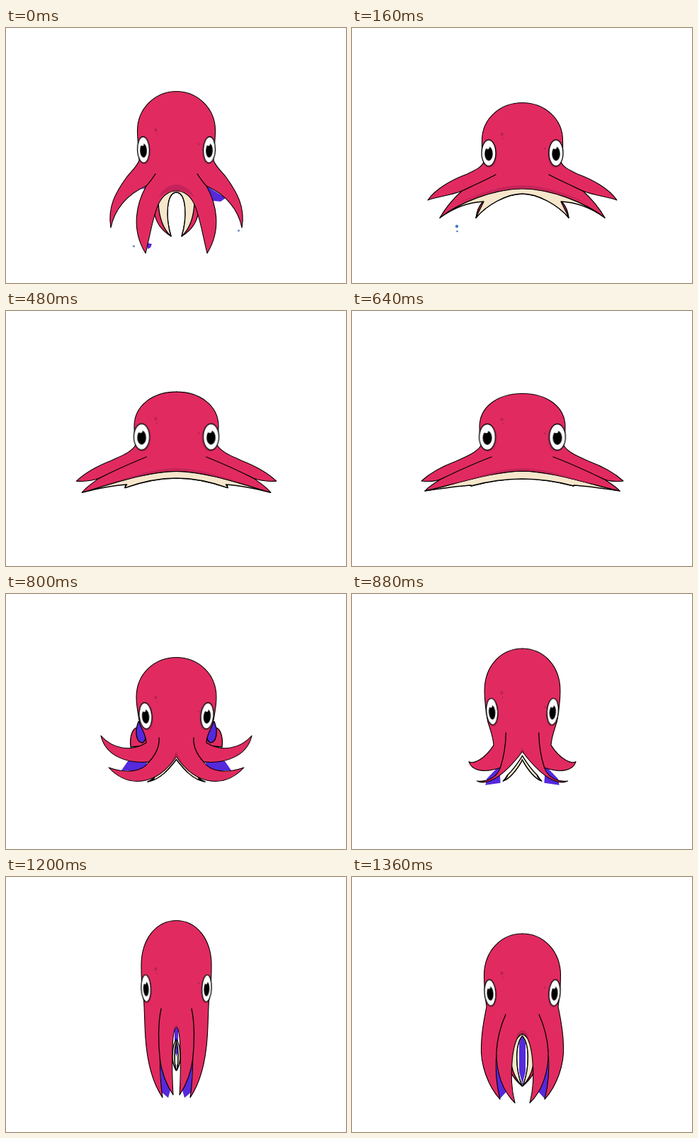
Recreate the animation shown at these times as an HTML page without scripts. Size 480x360 px, loop 1.44 s.

```html
<!DOCTYPE html>
<html lang="en">
<head>
<meta charset="utf-8">
<title>Swimming octopus</title>
<style>
html, body { margin: 0; width: 100%; height: 100%; overflow: hidden; background: #fff; }
svg { display: block; width: 100vw; height: 100vh; }
path, ellipse { stroke: #000; stroke-width: 1.3; stroke-linejoin: round; vector-effect: non-scaling-stroke; }
.move { animation: 1.44s steps(2) infinite; }
.body { animation-name: body; fill: #e12b60; stroke-width: 1.1; }
.crease { animation-name: crease; fill: none; stroke-linecap: round; }
.back { animation-name: back; fill: #e12b60; }
.belly { animation-name: belly; fill: #f6e6cb; }
.shade { animation-name: shade; fill: #c3245a; stroke: none; }
.inside { animation-name: inside; fill: #5529dc; stroke: none; }
.eye { animation-name: eye; }
.spots { animation-name: spots; fill: #bd2457; }
.flash { opacity: 0; animation: flash 1.44s step-end infinite; }
.curl { animation-delay: 800ms; }
.pink { fill: #e12b60; }
.blue { fill: #5529dc; }
.white { fill: #fff; }
.halo { fill: #c9265a; }
.plain { stroke: none; }

/* Each stretch advances one step per 80 ms. */
@keyframes body {
  0%, 100% { d: path("M241 89.5C210 89.5 185.5 114 185.5 145C185.5 160 188 172 188 187C184 197 176 203 170 211C155 232 143 252 148 282C153 257 170 235 198 223C184 248 176 284 197 318C209 270 211 230 241 230"); }
  11.111% { d: path("M241 105.5C209 105.5 183.5 128 183.5 159C183 170 184 180 186 189C183 197 173 201 163 206C141 214 118 227 107 243C120 238 138 237 155 230C144 240 132 254 124 268C150 247 200 227 241 227"); }
  22.222% { d: path("M241 109.5C209 109.5 183 131 183 161C183 172 184 181 185 188C178 199 165 203 153 209C132 218 115 227 102 240.5C118 241 133 238 145 233C136 240 124 249 116 260.5C145 246 198 227 241 227"); animation-timing-function: steps(3); }
  38.888%, 44.444% { d: path("M241 116.5C207 116.5 180 134 180 164C180 174 181 183 182 190C176 200 160 206 147 212C128 219 110 229 98 240C108 241 116 241 124 238C117 243 108 248 103 254C145 245 198 226 241 226"); }
  55.555% { d: path("M241 89.5C209 89.5 184 113 184 146C184 158 187 172 189 184C193 193 198 200 198 210C176 224 150 218 134 200C140 228 170 240 202 237C192 252 168 253 145 245C172 274 212 272 241 229"); animation-timing-function: steps(3); }
  72.222%, 77.777% { d: path("M241 52.2C212 52.2 193.2 80 193.2 118C193.2 135 194 155 197 172C200 190 202 205 204 220C208 255 212 285 227 310C226 295 225 278 224 262C228 276 234 290 239 302C241 270 236.5 205 241 208"); animation-timing-function: steps(3); }
  94.444% { d: path("M241 80C210 80 187 105 186.5 138C186.5 155 188 170 190 183C187 198 183 215 182.5 238C181 265 192 295 209 314C203 290 202 268 204 246C203 275 213 303 230 319C220 280 227 221 241 221"); animation-timing-function: steps(1); }
}
@keyframes crease {
  0%, 100% { d: path("M211 206C207 212 203 218 198 223"); }
  11.111% { d: path("M203 207C190 214 170 223 155 230"); }
  22.222% { d: path("M201 206C185 214 163 223 145 233"); animation-timing-function: steps(3); }
  38.888%, 44.444% { d: path("M197 206C170 216 145 228 124 238"); }
  55.555% { d: path("M216 203C217 216 211 227 202 237"); animation-timing-function: steps(3); }
  72.222%, 77.777% { d: path("M220 182C217 205 220 240 224 262"); animation-timing-function: steps(3); }
  94.444% { d: path("M217 194C209 212 205 230 204 246"); animation-timing-function: steps(1); }
}
@keyframes back {
  0%, 100% { d: path("M241 226C225 228 212 240 209 258C211 274 218 285 233 294C225 268 226 232 241 232"); }
  11.111% { d: path("M241 226C220 227 195 236 184 246C179 252 176 260 175 268C190 250 218 234 241 234"); }
  22.222% { d: path("M241 226C220 227 185 236 172 243C170 247 168 251 168 255C190 243 218 234 241 234"); animation-timing-function: steps(3); }
  38.888%, 44.444% { d: path("M241 226C220 227 180 240 168 245C168 246 168 246 168 247C190 241 218 237 241 237"); }
  55.555% { d: path("M241 226C232 238 222 250 208 260C206 262 203 264 200 265C218 262 230 247 241 233"); animation-timing-function: steps(3); }
  72.222%, 77.777% { d: path("M241 232C240 238 240 244 240 250C240 254 240 258 240 262C240 254 241 246 241 234"); animation-timing-function: steps(3); }
  94.444% { d: path("M241 222C230 230 225 250 224 275C228 284 234 290 240 295C230 270 230 235 241 224"); animation-timing-function: steps(1); }
}
@keyframes belly {
  0%, 100% { d: path("M241 226C228 228 218 234 215 245C215 245 215 245 215 246C216 268 222 284 233 294C225 268 226 232 241 232"); }
  11.111% { d: path("M241 226C200 227 150 247 124 268C143 254 165 246 186 245C182 254 177 262 175 268C190 250 218 234 241 234"); }
  22.222% { d: path("M241 226C198 227 145 246 116 261C138 250 158 244 176 243C172 247 169 251 168 255C190 243 218 234 241 234"); animation-timing-function: steps(3); }
  38.888%, 44.444% { d: path("M241 226C198 226 145 245 103 254C125 251 148 247 168 246C168 246 168 247 168 247C190 241 218 237 241 237"); }
  55.555% { d: path("M241 226C232 238 222 250 210 258C209 260 209 261 208 262C206 263 203 264 200 265C218 262 230 247 241 233"); animation-timing-function: steps(3); }
  72.222%, 77.777% { d: path("M241 232C240 238 240 244 240 250C240 250 240 251 240 251C240 255 240 259 240 262C240 254 241 246 241 234"); animation-timing-function: steps(3); }
  94.444% { d: path("M241 222C230 226 226 240 225 255C225 258 225 262 225 265C227 275 232 287 240 295C230 270 230 235 241 224"); animation-timing-function: steps(1); }
}
@keyframes shade {
  0%, 100% { d: path("M241 221C230 221 220 228 215 240C222 232 230 229 241 229"); }
  11.111% { d: path("M241 222C210 222 175 235 150 247C190 233 215 226 241 226"); }
  22.222% { d: path("M241 222C210 222 175 234 145 245C190 232 215 226 241 226"); animation-timing-function: steps(3); }
  38.888%, 44.444% { d: path("M241 222C210 222 175 234 135 246C190 232 215 225 241 225"); }
  55.555% { d: path("M241 221C239 226 236 231 233 237C236 234 239 231 241 228"); animation-timing-function: steps(3); }
  72.222%, 77.777% { d: path("M241 205C239 206 238 210 238 214C239 211 240 208 241 207"); animation-timing-function: steps(3); }
  94.444% { d: path("M241 216C236 216 232 222 231 230C234 223 238 220 241 220"); animation-timing-function: steps(1); }
}
@keyframes inside {
  0%, 100% { d: path("M190 228L206 220L203 228L194 227ZM241 224L240 224L240 225L241 225Z"); }
  11.111%, 44.444% { d: path("M180 215L182 215L182 217L180 217ZM241 215L240 215L240 216L241 216Z"); }
  55.555% { d: path("M200 236L172 236L163 249L195 250ZM241 215L240 215L240 216L241 216Z"); animation-timing-function: steps(3); }
  72.222%, 77.777% { d: path("M224 255L227 310L239 311L239 300ZM241 205L239 207L239 232L241 234Z"); animation-timing-function: steps(3); }
  94.444% { d: path("M204 245L203 290L209 313L218 303ZM241 221L236 235L236 275L241 294Z"); animation-timing-function: steps(1); }
}
@keyframes eye {
  0%, 100% { transform: translate(194px, 172px) rotate(-2deg) scale(.85, 1); }
  11.111% { transform: translate(193px, 176.5px) rotate(0deg) scale(1, 1); }
  22.222% { transform: translate(192.5px, 177px) rotate(0deg) scale(1.04, 1); animation-timing-function: steps(3); }
  38.888%, 44.444% { transform: translate(191px, 178px) rotate(0deg) scale(1.14, 1); }
  55.555% { transform: translate(197px, 172px) rotate(-5deg) scale(.9, 1); animation-timing-function: steps(3); }
  72.222%, 77.777% { transform: translate(199px, 154px) rotate(-2deg) scale(.62, 1.04); animation-timing-function: steps(3); }
  94.444% { transform: translate(195px, 163.5px) rotate(-4deg) scale(.8, 1); animation-timing-function: steps(1); }
}
@keyframes spots {
  0%, 100% { transform: translateY(0); }
  11.111% { transform: translateY(6px); }
  22.222% { transform: translateY(7px); animation-timing-function: steps(3); }
  38.888%, 44.444% { transform: translateY(9px); }
  55.555% { transform: translateY(2px); animation-timing-function: steps(3); }
  72.222%, 77.777% { transform: translateY(-17px); animation-timing-function: steps(3); }
  94.444% { transform: translateY(-8px); animation-timing-function: steps(1); }
}
@keyframes flash {
  0% { opacity: 1; }
  5.555%, 100% { opacity: 0; }
}
</style>
</head>
<body>
<svg viewBox="0 0 480 360">
  <g class="flash blue">
    <path class="plain" d="M277 219L310 240L303 245L292 244ZM198 303L206 305L204 310L200 312Z"/>
    <g fill="#6f86c8"><circle cx="180.5" cy="308" r="1.6"/><circle cx="328.5" cy="286" r="1.6"/></g>
  </g>
  <g class="flash" style="animation-delay: 160ms" fill="#4a7fc0">
    <circle cx="148" cy="280" r="2.2"/><circle cx="148.5" cy="287" r="1.3"/>
  </g>

  <!-- Left half -->
  <g>
    <path class="move inside"/>
    <g class="flash curl">
      <path class="pink" d="M189 190C180 184 174 200 176 216L198 214V190Z"/>
      <path class="blue" d="M187 180C181 195 184 210 193 210C199 206 198 195 196 188Z"/>
    </g>
    <path class="move back"/>
    <path class="move belly"/>
    <path class="move body"/>
    <path class="move shade"/>
    <path class="move crease"/>
    <g class="move eye">
      <ellipse class="plain halo" cx="1.5" cy="1.5" rx="10.5" ry="19.5"/>
      <ellipse class="white" rx="10" ry="18.5"/>
      <ellipse class="plain" cy="1" rx="5.7" ry="10"/>
      <circle class="white" cx="-1.5" cy="-8" r="2.5"/>
    </g>
  </g>

  <!-- Right half, mirrored -->
  <g transform="translate(481) scale(-1 1)">
    <path class="move inside"/>
    <g class="flash curl">
      <path class="pink" d="M189 190C180 184 174 200 176 216L198 214V190Z"/>
      <path class="blue" d="M187 180C181 195 184 210 193 210C199 206 198 195 196 188Z"/>
    </g>
    <path class="move back"/>
    <path class="move belly"/>
    <path class="move body"/>
    <path class="move shade"/>
    <path class="move crease"/>
    <g class="move eye">
      <ellipse class="plain halo" cx="1.5" cy="1.5" rx="10.5" ry="19.5"/>
      <ellipse class="white" rx="10" ry="18.5"/>
      <ellipse class="plain" cy="1" rx="5.7" ry="10"/>
      <circle class="white" cx="1.5" cy="-8" r="2.5"/>
    </g>
  </g>

  <g class="move spots">
    <circle cx="211.5" cy="144" r="2.4"/>
    <circle cx="213" cy="150" r="1.1"/>
    <circle cx="272" cy="164" r="1.6"/>
  </g>
  <g class="flash" style="animation-delay: 320ms" fill="#fff">
    <circle cx="149" cy="238" r="2"/><circle cx="142" cy="244" r="1"/>
  </g>
</svg>
</body>
</html>
```
